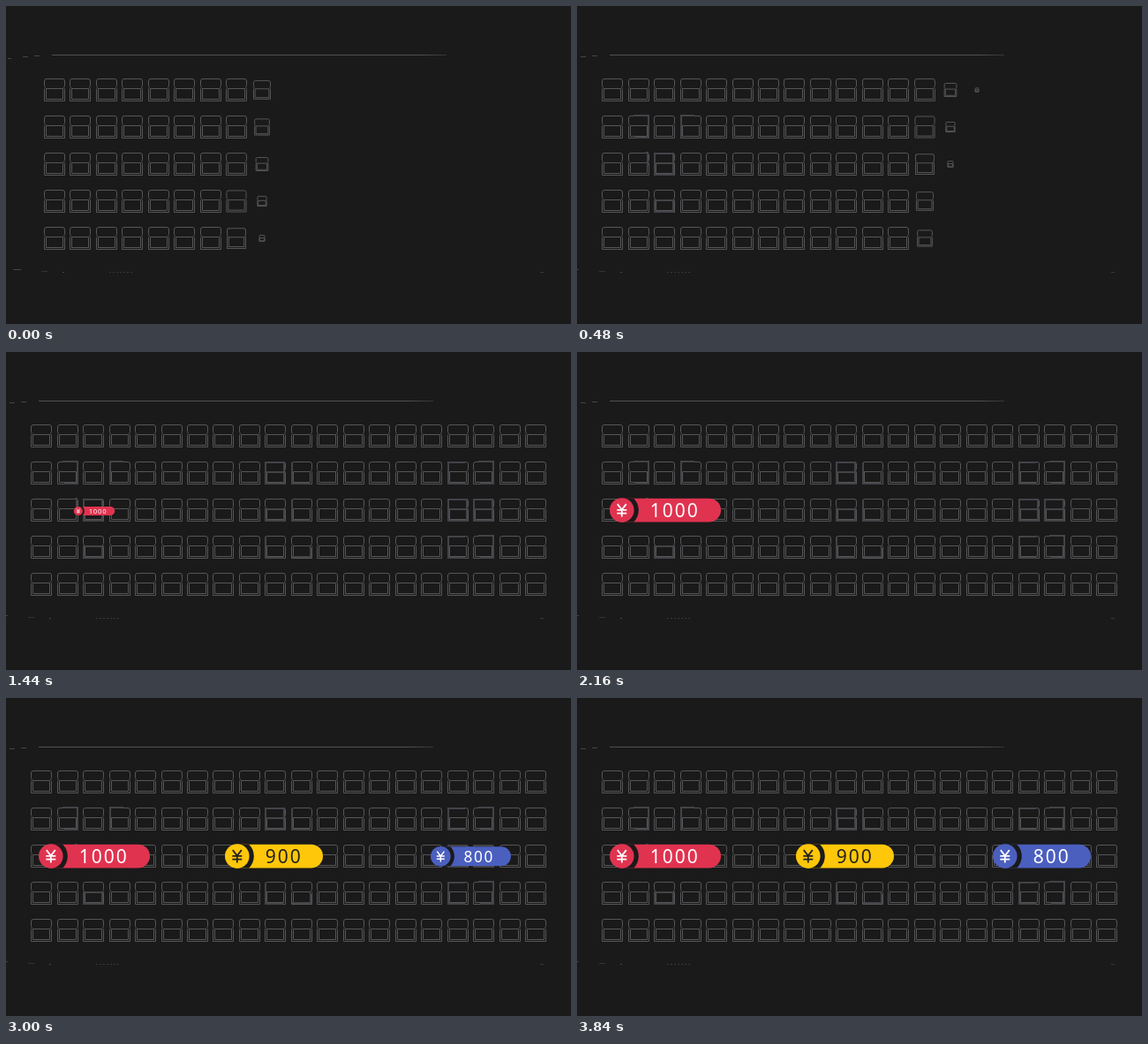
Animation, 640 px wide and 360 px high, one loop 3960 ms. Source, as an HTML page with a canvas:

```html
<!DOCTYPE html>
<html lang="en">
<head>
<meta charset="utf-8">
<title>Seat prices</title>
<style>
html, body { margin: 0; width: 100%; height: 100%; overflow: hidden; background: #1a1a1a; }
canvas { display: block; width: 640px; height: 360px; }
</style>
</head>
<body>
<canvas id="stage" width="640" height="360"></canvas>
<script>
const ctx = document.getElementById('stage').getContext('2d');
const LOOP = 3960, STEP = 120;
const COLS = 20, ROWS = 5, W = 24, H = 26;
const BG = '#1a1a1a', LINE = '#565658', SHADE = '#434348';

const clamp = v => Math.max(0, Math.min(1, v));
const easeOut = v => 1 - (1 - clamp(v)) ** 2;
const colX = c => 28.2 + 29.47 * c;
const rowY = r => 82 + 42 * r;

// Back rest, then arms and cushion
const seatPath = new Path2D(
  'M1.5 10.5L.5 8.5V3Q.5 .5 3 .5H21Q23.5 .5 23.5 3V8.5L22.5 10.5' +
  'M1.5 10.5Q.5 11 .5 12.5V25.5H23.5V12.5Q23.5 11 22.5 10.5' +
  'M2.5 23.5V11.5H21.5V23.5Z');
const yenPath = new Path2D('M-5 -7L0 -.5L5 -7M0 -.5V7.5M-5.5 -.3H5.5M-5.5 3.6H5.5');

const pills = [
  { x: 37, w: 126, price: '1000', fill: '#e03350', ink: '#fff', start: 1366 },
  { x: 248, w: 111, price: '900', fill: '#ffc709', ink: '#222', start: 2170 },
  { x: 471, w: 111, price: '800', fill: '#4b5fbf', ink: '#fff', start: 2793 }
];

// Heavier strokes on some seats: start time, then [column, row, path]
const box = 'M1 12H22V25H1Z', full = 'M1 12V1H22V25H1V12H22';
const corner = 'M1 1V25H21', hook = 'M6 0H23V25H8', bracket = 'M20 1H1V25H20';
const shades = [
  [360, [[1, 1, hook], [3, 1, 'M16 0H1V25'], [2, 2, full],
         [1, 2, 'M20 0H22V14'], [2, 3, box]]],
  [720, [[9, 1, full], [10, 1, corner], [9, 2, box], [10, 2, corner],
         [9, 3, corner], [10, 3, 'M1 24H22V14']]],
  [960, [[17, 2, 'M1 10V25']]],
  [1080, [[16, 1, bracket], [17, 1, hook], [16, 2, full], [17, 2, full],
          [16, 3, bracket], [17, 3, hook]]]
];

function dash(x, y, w, color = '#454547') {
  ctx.fillStyle = color;
  ctx.fillRect(Math.round(x), y, w, 1);
}

function drawEdges(shift) {
  const fade = ctx.createLinearGradient(455 + shift, 0, 495 + shift, 0);
  fade.addColorStop(0, '#505052');
  fade.addColorStop(1, '#2a2a2b');
  dash(37 + shift, 55, 447, fade);
  dash(4 + shift, 57, 6);
  dash(17 + shift, 56, 6);
  dash(shift - 13, 59, 4);
  dash(shift - 7, 298, 9);
  dash(25 + shift, 300, 7, '#333335');
  dash(49 + shift, 301, 2);
  for (let x = 102; x < 128; x += 4) dash(x + shift, 301, 2, '#38383a');
  dash(605, 301, 4, '#38383a');
}

function drawSeats(t, shift) {
  const head = 45.3 + t * 23 / 480;
  ctx.strokeStyle = LINE;
  for (let n = 0; n < COLS * ROWS; n++) {
    const c = Math.floor(n / ROWS), r = n % ROWS;
    const order = c < 14 ? n : n - 2.5;
    const s = easeOut((head - order) / 9);
    if (s < 0.15) continue;
    ctx.save();
    ctx.translate(Math.round(colX(c) + shift) + W / 2, rowY(r) + H / 2);
    ctx.scale(s, s);
    ctx.translate(-W / 2, -H / 2);
    ctx.lineWidth = 1 / s;
    ctx.stroke(seatPath);
    ctx.restore();
  }
}

function drawShades(t) {
  ctx.strokeStyle = SHADE;
  ctx.lineWidth = 2;
  for (const [start, parts] of shades) {
    if (t < start) continue;
    for (const [c, r, d] of parts) {
      ctx.save();
      ctx.translate(Math.round(colX(c)), rowY(r));
      ctx.stroke(new Path2D(d));
      ctx.restore();
    }
  }
}

function disc(x, r, color) {
  ctx.fillStyle = color;
  ctx.beginPath();
  ctx.arc(x, 0, r, 0, 7);
  ctx.fill();
}

function drawPill({ x, w, price, fill, ink, start }, t) {
  const s = easeOut((t - start) / 360);
  if (!s) return;
  ctx.save();
  ctx.translate(x + w / 2, 180.5);
  ctx.scale(s, s);
  ctx.translate(-w / 2, -1.4);

  // Body, with a dark gap cut around the coin
  ctx.save();
  ctx.beginPath();
  ctx.roundRect(14, -13.4, w - 14, 26.8, [0, 13.4, 13.4, 0]);
  ctx.clip();
  ctx.fillStyle = fill;
  ctx.fillRect(14, -14, w, 28);
  disc(13.8, 19, BG);
  ctx.restore();

  disc(13.8, 13.8, fill);
  ctx.save();
  ctx.translate(13.8, 0);
  ctx.strokeStyle = ink;
  ctx.lineWidth = 1.8;
  ctx.stroke(yenPath);
  ctx.restore();

  ctx.fillStyle = ink;
  ctx.font = '21px "Noto Sans", "Open Sans", sans-serif';
  ctx.letterSpacing = '2px';
  ctx.fillText(price, 45.8, 8);
  ctx.restore();
}

function draw(now) {
  const t = Math.floor(now % LOOP / STEP) * STEP;
  const shift = 14.5 * (1 - easeOut(t / 480));
  ctx.fillStyle = BG;
  ctx.fillRect(0, 0, 640, 360);
  drawEdges(shift);
  drawSeats(t, shift);
  drawShades(t);
  pills.forEach(p => drawPill(p, t));
}

const began = performance.now();
function tick() {
  draw(performance.now() - began);
  requestAnimationFrame(tick);
}
tick();
</script>
</body>
</html>
```
